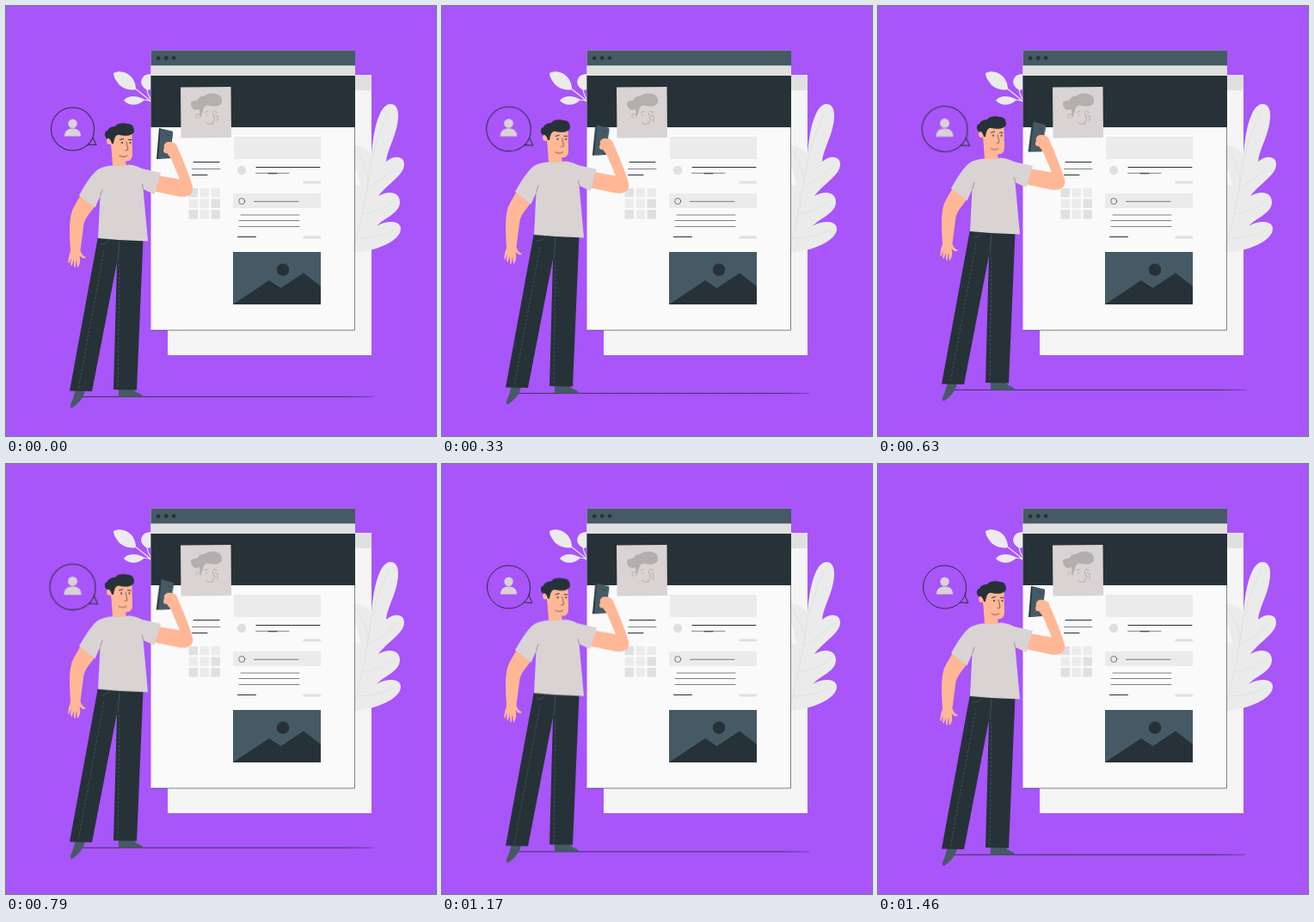
An HTML page for the animation above (1500 ms loop, 500x500 px).

```html
<!DOCTYPE html>
<html lang="en">
<head>
<meta charset="utf-8">
<title>Profile page</title>
<style>
  html, body { margin: 0; width: 100%; height: 100%; overflow: hidden; background: #a855fa; }
  svg { display: block; width: 100vw; height: 100vh; }
  .dark { fill: #263238; }
  .slate { fill: #455a64; }
  .pale { fill: #ebebeb; }
  .gray { fill: #e0e0e0; }
  .cloth { fill: #d9d3d3; }
  .skin { fill: #ffb796; }
  .line { fill: none; stroke: #263238; stroke-width: 1; stroke-linecap: round; stroke-linejoin: round; }
  .thin { stroke-width: .6; }
  .vein { fill: none; stroke: #dedede; stroke-width: .8; }
  .seam { fill: none; stroke: #455a64; stroke-width: .8; }
  .dash { stroke-dasharray: 3 2; }

  .body { animation: lift 1500ms infinite; }
  .phone { transform-origin: 184px 170px; animation: tilt 1500ms infinite; }
  .look { animation: look 1500ms infinite; }
  .bubble { transform-origin: 77.5px 143px; animation: pulse 1500ms ease-in-out infinite; }

  @keyframes lift {
    0% { transform: translateY(0); animation-timing-function: cubic-bezier(.38, .2, .65, .9); }
    46.7% { transform: translateY(-8.4px); animation-timing-function: cubic-bezier(.45, 0, .65, .95); }
    100% { transform: translateY(0); }
  }
  @keyframes tilt {
    0%, 100% { transform: rotate(0); animation-timing-function: ease-in-out; }
    46.7% { transform: rotate(2.5deg); animation-timing-function: ease-in-out; }
  }
  @keyframes look {
    0%, 100% { transform: translate(0, 0); animation-timing-function: ease-in-out; }
    46.7% { transform: translate(-1px, -.4px); animation-timing-function: ease-in-out; }
  }
  @keyframes pulse {
    0%, 30.7%, 61.3%, 100% { transform: scale(1); }
    11%, 48.5% { transform: scale(1.08); }
  }
</style>
</head>
<body>
<svg viewBox="0 0 500 500">
  <defs>
    <linearGradient id="ground" gradientUnits="userSpaceOnUse" x1="89" y1="0" x2="427" y2="0">
      <stop offset="0" stop-color="#263238"/>
      <stop offset=".9" stop-color="#263238"/>
      <stop offset="1" stop-color="#263238" stop-opacity=".4"/>
    </linearGradient>
  </defs>
  <rect width="500" height="500" fill="#a855fa"/>

  <!-- sprig -->
  <g class="pale">
    <path d="M125 78C132 74 142 77 147 84C150 88 151 93 151 97C143 99 133 95 129 88C127 85 125 82 125 78Z"/>
    <path d="M165 98C158 95 155 89 159 83C161 80 165 79 168 79V97Z"/>
    <path d="M137 110C141 104 152 103 161 109C155 116 143 117 137 110Z"/>
    <path d="M150 96Q158 102 169 111M164 97Q165 104 169 109M159 109Q165 109 169 111" fill="none" stroke="#ebebeb" stroke-width="1.2"/>
  </g>

  <!-- back page -->
  <path d="M188 80H425V406H188Z" fill="#f5f5f5"/>
  <path class="gray" d="M188 80H425V98H188Z"/>

  <!-- big leaf -->
  <path class="pale" d="M404 162C414 162 421 167 425 173C427 145 434 114 447 114C459 114 457 133 453 146C449 159 443 170 442 181C451 173 463 174 463 184C463 197 444 206 433 221C445 214 458 216 458 228C458 241 440 246 431 256C442 249 459 249 459 259C459 273 431 285 404 287Z"/>
  <path d="M405 182L413 209L405 208Z" fill="#f5f5f5"/>
  <path class="vein" d="M406 276Q417 235 425 180Q434 144 445 124M420 211Q440 201 456 185M416 242Q438 238 452 226M408 270Q432 270 452 260M422 205Q417 181 407 168"/>

  <!-- front page -->
  <path d="M168.500 51.500H405.500V377H168.500Z" fill="#fafafa"/>
  <path class="line thin" d="M405.500 81V377H169"/>
  <path class="slate" d="M168.500 51.500H406V69.500H168.500Z"/>
  <path class="gray" d="M168.500 69.500H406V81H168.500Z"/>
  <path class="dark" d="M168.500 81H406V141H168.500Z"/>
  <g class="dark">
    <circle cx="177.200" cy="60.700" r="2.300"/>
    <circle cx="186.200" cy="60.500" r="2.300"/>
    <circle cx="195" cy="60.500" r="2.300"/>
  </g>

  <!-- portrait -->
  <path class="cloth" d="M203 94.500L261.500 94L262 153L203.500 153.500Z"/>
  <path d="M226 130C224 126 227 122 224 120C219 123 215 118 215 113C216 109 221 111 223 109C224 104 230 106 233 103C240 100 251 102 251 109C252 116 244 118 237 116C233 114 229 118 229 122Z" fill="#b3afae"/>
  <path d="M225 127C221 124 219 128 223 131M231 124L235 122M241 122L246 124M240 124L243 133L239 135M232 135Q236 139 242 136M246 127V135M233 126V128M244 126V128" fill="none" stroke="#b3afae"/>

  <!-- sidebar -->
  <path class="line" d="M218 181.500H248M216.500 196.500H234"/>
  <path class="line thin" d="M216.500 189.500H249"/>
  <g class="gray">
    <path d="M212.500 212h10.500v10.200h-10.500zM238.500 224.500h10.500v10.200h-10.500zM212.500 237h10.500v10.500h-10.500zM238.500 237h10.500v10.500h-10.500z"/>
    <path class="pale" d="M225.500 212h10.500v10.200h-10.500zM238.500 212h10.500v10.200h-10.500zM212.500 224.500h10.500v10.200h-10.500zM225.500 224.500h10.500v10.200h-10.500zM225.500 237h10.500v10.500h-10.500z"/>
  </g>

  <!-- posts -->
  <path class="pale" d="M265 152H366V178H265ZM264 218H366V235H264Z"/>
  <circle class="gray" cx="274" cy="191" r="5.200"/>
  <path class="gray" d="M345.500 203.500H366V206.500H345.500ZM345.500 267.500H366V270.500H345.500Z"/>
  <path class="line" d="M291 187.500H365M305 194.800H315M269.500 268.500H290.500"/>
  <path class="line thin" d="M290.500 194.300H329M288.500 227.300H340M271 249.500H341M273 243H341M271 256.500H341"/>
  <circle class="line thin" cx="274.200" cy="227" r="3.500"/>
  <path class="slate" d="M264 286H366V347H264Z"/>
  <circle class="dark" cx="322" cy="306.700" r="7.200"/>
  <path class="dark" d="M264 347L306 319L319.500 328L346 310.500L366 326V347Z"/>

  <!-- speech bubble -->
  <g class="bubble">
    <path class="line" d="M102 150C98 163 87 168 77.500 168A25 25 0 1 1 102.500 143Q102.500 148 101 153L105 161.500L95 161"/>
    <circle class="cloth" cx="77.500" cy="136.700" r="5.200"/>
    <path class="cloth" d="M68 151.500C68 145 72 142.500 77.500 142.500S87 145 87 151.500Z"/>
  </g>

  <!-- person -->
  <g class="body">
    <path d="M89 454.400H427" fill="none" stroke="url(#ground)" stroke-width=".9"/>
    <path class="slate" d="M81 446H92C91 456 82 464 76.500 467.500C74 467 75 462 77 459ZM131 445H148C150 450 157 450 160 454.500H131Z"/>
    <path class="dark" d="M107 268L159.500 271L152 446.500L125 446L129 298L100 448L74 447.500Z"/>
    <path class="seam" d="M132 273L130 297M110 277C116 277 119 275 120 271"/>
    <path class="seam dash" d="M114 284L84 446M132 300L130 445"/>

    <!-- hanging arm -->
    <path class="skin" d="M88 217L104 232C96 243 91 247 90 257L86.500 284C88 289 90 291 93 292C91 295 87 292 85.500 290C87 297 86 300 83.500 304C82 303 83 298 82 295L80.500 304C78.500 305 79 298 79 295L76.500 302C74 302 76 294 75.500 293L73.500 299C71 299 73 291 75 285C74 268 73 252 76 241C78 233 84 226 88 217Z"/>

    <!-- raised arm -->
    <path class="skin" d="M176 197L202 201.500L187 166L198 161C205 177 212 193 217 210C219 219 211 224 199 221L170 215Z"/>

    <path class="skin" d="M122 158L124 186Q131 189 140 185.500L138 176Z"/>
    <path class="cloth" d="M123 185.500Q132 187 143 184.500Q151 185 158 189L180 194L172.500 219L159.500 213L165 273.500Q136 273 107 270L109.500 221L103.500 234.500L85 220C92 208 99 196 107 190Q114 186 123 185.500Z"/>
    <path d="M109.500 221L112 213M159.500 213L158.500 207" fill="none" stroke="#8e8787" stroke-width=".8"/>

    <!-- head -->
    <path class="skin" d="M122 149H146.500L147 172C147 179 143 181.500 137 180C129 179 123 170 122 160Z"/>
    <circle class="skin" cx="120.500" cy="157.500" r="3.400"/>
    <path class="dark" d="M123 160C122 156 120 153 117 154C114 151 114 146 118 145C119 141 125 140 127 140C130 135 139 136 141 137C147 136 150 142 148.500 147C145 152 136 151 132 150C128 149 126 153 125 160Z"/>
    <g class="look">
      <path class="line" d="M132.500 155.500L136.500 154.500M142.500 155.500L146 155.700"/>
      <path class="line thin" d="M140 158L142 167L139 168M132 174Q136 177 141 174"/>
      <circle class="dark" cx="135" cy="159" r="1"/>
      <circle class="dark" cx="144.500" cy="159" r="1"/>
    </g>

    <!-- phone and hand -->
    <g class="phone">
      <path class="dark" d="M178 142L194 146L191 177L175 178Z"/>
      <path class="slate" d="M179.500 142.500L194 146L191 176.500L177 177.500Z"/>
      <path class="line thin" d="M187 150L190 150.500"/>
    </g>
    <path class="skin" d="M187 171C183 172 182 168 184 165C183 161 185 158 190 158C195 158 198 160 199 164L193 179Z"/>
  </g>
</svg>
</body>
</html>
```
